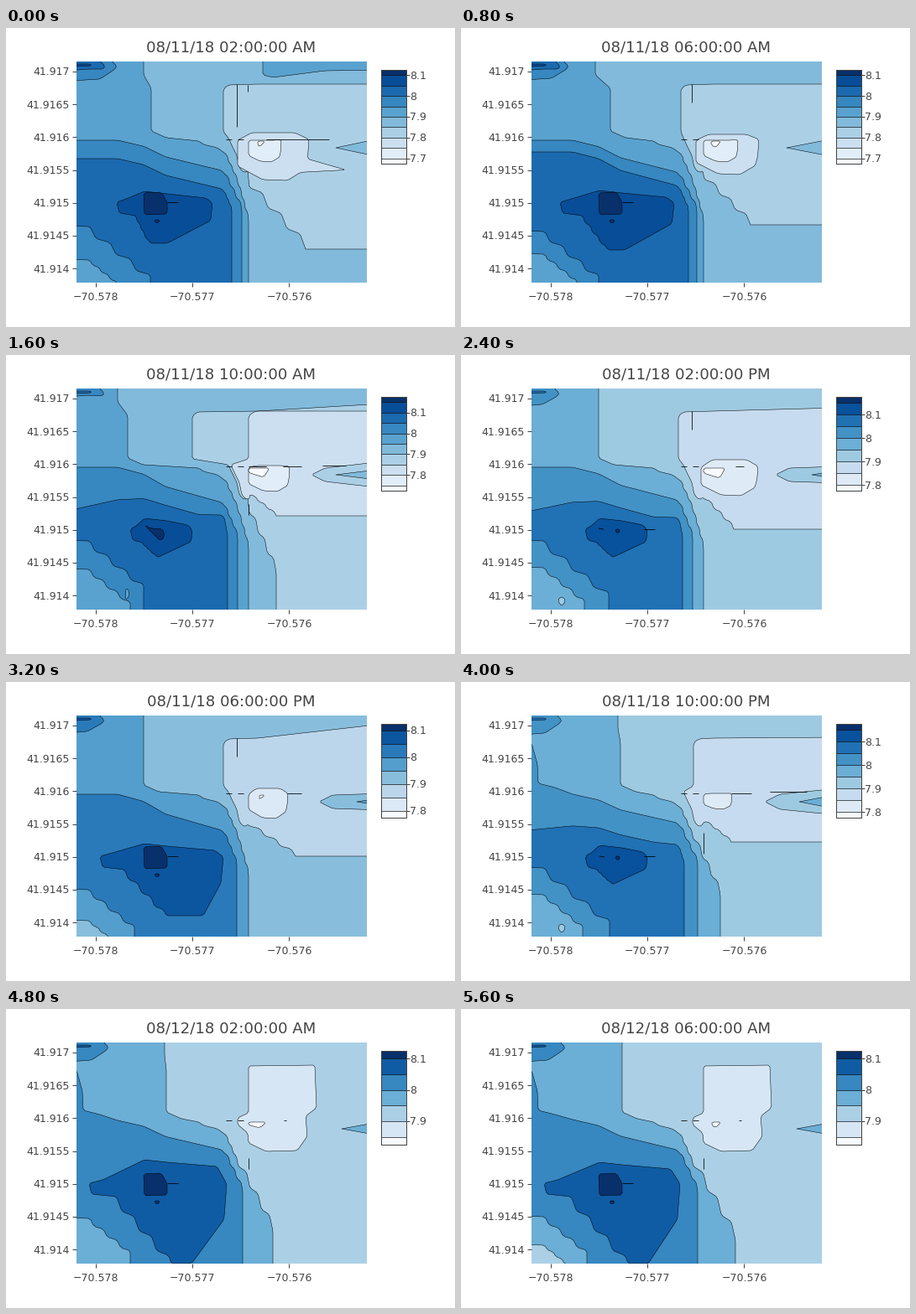
Recreate the animation shown at these times as a matplotlib script. Size 535 by 357 pixels, loop 6400 ms.

```python
import numpy as np
import matplotlib.pyplot as plt
from matplotlib.animation import FuncAnimation
from matplotlib.patches import Polygon, Rectangle

W, H, DPI = 535, 357, 100
PX = 72 / DPI
INK = "#444444"
LEFT, TOP, RIGHT, BOTTOM = 84, 40, 430, 304
# Outlines run past the plot edges to these lines and are clipped.
FAR_L, FAR_R, FAR_T, FAR_B = 60, 450, 20, 330
BLUES = np.array([(247, 251, 255), (222, 235, 247), (198, 219, 239),
                  (158, 202, 225), (107, 174, 214), (66, 146, 198),
                  (33, 113, 181), (8, 81, 156), (8, 48, 107)]) / 255

plt.rcParams["font.family"] = "DejaVu Sans"


# Contour rules: each returns the outline of one band.

def steps(x0, y0, x1, y1, n=3):
    """Staircase: mostly level, then a drop, n times."""
    pts = [(x0, y0)]
    for i in range(n):
        for u, v in ((0.7, 0.25), (1, 1)):
            pts.append((x0 + (x1 - x0) * (i + u) / n, y0 + (y1 - y0) * (i + v) / n))
    return pts


def tail(y, x):
    """Lower left edge, from the bottom at x up to the left side at y."""
    return [(x, FAR_B)] + steps(x, y + 0.8 * (x - 100), 100, y) + [(FAR_L, y - 1)]


def crest(x_top, x_mid, x_end, end=((FAR_L, FAR_B),)):
    """Region reaching the top edge, bounded by a line down to x_end."""
    pts = [(FAR_L, FAR_T), (x_top, FAR_T), (x_top, 56), (x_mid, 72), (x_mid, 123),
           (x_mid + 18, 131), (230, 135), (235, 139), (252, 143)]
    pts += steps(260, 149, 276, 184) + steps(277, 188, x_end, 230 + 1.2 * (x_end - 289))
    return pts + [(x_end, FAR_B), *end]


def front(y0, y1, x_end, end, hump=0, lip=False):
    """Region bounded by a line from the left side at y0, past (259, y1), to x_end."""
    pts = [(FAR_L, y0)]
    if lip:
        pts = [(FAR_L, 70), (84, 73), (91, 98), (92, 121), (112, 126)]
    for x, fall, lift in ((133, 0, 0.9), (164, 0.2, 1), (190, 0.55, 0.6),
                          (230, 0.82, 0), (257, 1, 0)):
        pts.append((x, y0 + (y1 - y0) * fall - hump * lift))
    return pts + steps(260, y1 + 4, x_end, 217) + [(x_end, FAR_B), *end]


def blob(left, right, top, bottom, foot, half):
    """Closed peak, widest at y = 208, narrowing to a foot."""
    w, h = right - left, bottom - 208
    return [(left, 208), (left + 0.1 * w, 204), (165, top), (192, top + 3),
            (right - 0.07 * w, top + 8), (right, 209), (right - 0.02 * w, 208 + 0.45 * h),
            (foot + half, bottom), (foot - half, bottom),
            *steps(foot - half - 3, bottom - 0.1 * h, left + 0.2 * w, 224), (left + 3, 221)]


def corner(y, x):
    return [(FAR_L, y), (x - 20, y - 3), (x - 2, 49), (x, 45), (x - 6, 40),
            (x - 6, FAR_T), (FAR_L, FAR_T)]


def shelf(left, top, bend, floor=None, seam=0):
    """Low region on the right; its lower edge steps down to bend."""
    bx, by = bend
    floor = floor or by
    seam_pts = [(265, 131), (269, 140), (275, 152), (278, 167), (284, 173), (288, 170)]
    return [(FAR_R, top), (375, (top + 67) / 2), (300, 67), (left + 6, 68), (left, 73),
            (left, 124), *((x + seam, y) for x, y in seam_pts),
            *steps(290, 172 + (by - 208) / 3, bx, by), (bx, floor), (FAR_R, floor)]


def pocket(left, right, top, bottom, spur=None):
    w, h = right - left, bottom - top
    return [(left, 134), (left + 0.2 * w, top), (right - 0.2 * w, top), (right, 133),
            (right - 0.02 * w, top + 0.55 * h), (spur or right - 0.06 * w, top + 0.78 * h),
            (right - 0.12 * w, top + 0.83 * h), (right - 0.3 * w, bottom),
            (left + 0.35 * w, bottom - 1), (left, top + 0.7 * h)]


def chip(left, right, depth):
    return [(left, 135), (right, 135), (right - 7, 135 + depth), (left, 135 + depth / 2)]


def tongue(x, h, blunt=0):
    return [(FAR_R, 143 - h), (x + 2 * blunt, 143 - blunt), (x, 143),
            (x + 2 * blunt, 143 + blunt), (FAR_R, 143 + h)]


CORE = [(164, 197), (185, 196), (192, 208), (192, 222), (165, 223)]
CHEVRON = [(176, 229), (184, 229), (180, 234)]
SLIVER = [(FAR_L, 43), (100, 43), (102, 45), (FAR_L, 47)]
RING = [(115, 293), (120, 288), (125, 293), (120, 300)]
NOTCH = [(183, 208), (190, 208), (187, 214)]
SHELL = [(306, FAR_T), (306, 56), (318, 59), (380, 51), (FAR_R, 50), (FAR_R, FAR_T)]
ISLAND = [(289, 68), (368, 67), (370, 118), (357, 128), (359, 152), (347, 169),
          (310, 170), (289, 160), (288, 148), (276, 138), (276, 130), (289, 124)]
ARROW = blob(148, 222, 195, 241, 181, 1)


class Scene:
    """lo is the lowest band, n the number of bands, base the backdrop's band."""

    def __init__(self, lo, n, base, shapes, dashes=()):
        self.lo, self.n, self.base = lo, n, base
        self.shapes = shapes
        self.dashes = [(262, 133, 269, 133), (276, 133, 283, 133), *dashes]

    def color(self, band):
        pos = np.clip((band - self.lo) / (self.n - 1), 0, 1) * 8
        return [np.interp(pos, range(9), BLUES[:, c]) for c in range(3)]


RIDGE = (192, 208, 205, 208)
SLOT = (275, 67, 275, 89)
STEM = (289, 178, 289, 191)

SCENES = [
    Scene(0, 10, 4, [
        (5, crest(164, 173, 289)), (6, front(134, 170, 281, tail(277, 132))),
        (7, front(156, 192, 269, tail(237, 172))), (8, blob(132, 246, 195, 257, 182, 10)),
        (9, CORE), (9, CHEVRON), (6, corner(64, 132)), (7, corner(52, 118)),
        (8, SLIVER), (5, SHELL), (3, shelf(259, 67, (357, 264))),
        (2, pocket(276, 361, 125, 182, 405)), (1, pocket(289, 328, 134, 160)),
        (0, chip(300, 309, 7)), (4, tongue(393, 12))],
        [RIDGE, (275, 67, 275, 118), (288, 68, 288, 76), (310, 133, 385, 133)]),
    Scene(0, 10, 4, [
        (5, crest(160, 178, 289)), (6, front(134, 172, 281, tail(270, 138))),
        (7, front(148, 188, 271, tail(243, 164))), (8, blob(118, 254, 194, 265, 185, 10)),
        (9, CORE), (9, CHEVRON), (6, corner(63, 128)), (7, corner(52, 118)),
        (8, SLIVER), (3, shelf(262, 67, (345, 235))),
        (2, pocket(280, 355, 127, 175)), (1, pocket(289, 330, 134, 160)),
        (0, chip(298, 310, 8)), (4, tongue(388, 12))],
        [RIDGE, SLOT]),
    Scene(1, 10, 5, [
        (6, crest(133, 145, 289)), (7, front(134, 176, 276, tail(256, 148))),
        (8, front(189, 191, 264, tail(222, 164), hump=18)), (9, ARROW),
        (10, [(165, 203), (173, 207), (187, 208), (189, 217), (184, 222)]),
        (7, corner(51, 117)), (8, SLIVER),
        (6, [(143, 278), (147, 282), (146, 290), (142, 292)]),
        (4, shelf(222, 58, (322, 260), FAR_B)), (3, shelf(289, 67, (322, 192), seam=3)),
        (2, pocket(289, 338, 132, 163)), (1, chip(289, 314, 11)),
        (4, tongue(364, 16, 8)), (5, tongue(393, 7))],
        [(289, 133, 310, 133), (330, 133, 352, 133), (377, 132, 405, 132), STEM]),
    Scene(2, 9, 5, [
        (6, crest(164, 164, 289)), (7, front(134, 173, 276, tail(254, 147))),
        (8, front(191, 194, 264, tail(222, 176), hump=17)), (9, ARROW), (10, NOTCH),
        (7, corner(62, 117)), (8, SLIVER), (5, RING),
        (4, shelf(259, 63, (325, 208))), (3, pocket(286, 354, 125, 168)),
        (2, chip(289, 315, 12)), (5, tongue(375, 10, 8)), (6, tongue(418, 5))],
        [SLOT, (327, 133, 337, 133), (164, 207, 170, 208), (218, 208, 231, 208)]),
    Scene(2, 8, 5, [
        (6, crest(164, 164, 289, tail(285, 130))),
        (7, front(134, 177, 275, tail(248, 153))), (8, blob(112, 259, 193, 279, 213, 22)),
        (9, CORE), (9, CHEVRON), (7, corner(62, 117)), (8, SLIVER),
        (4, shelf(259, 50, (345, 208))), (3, pocket(289, 336, 127, 163)),
        (2, chip(302, 309, 5)), (5, tongue(373, 10, 8)), (6, tongue(418, 5))],
        [RIDGE, SLOT, (335, 133, 352, 133)]),
    Scene(2, 9, 5, [
        (6, crest(187, 190, 309)), (7, front(134, 168, 282, tail(254, 145), lip=True)),
        (8, front(179, 194, 266, tail(222, 177), hump=8)), (9, ARROW), (10, NOTCH),
        (7, corner(64, 120)), (8, SLIVER), (5, RING),
        (4, shelf(277, 66, (322, 191))), (3, pocket(289, 323, 133, 152)),
        (5, tongue(362, 16, 9)), (6, tongue(403, 9))],
        [(322, 133, 346, 133), (368, 131, 412, 131), (289, 180, 289, 205),
         (165, 208, 171, 209), (218, 208, 231, 208)]),
    Scene(3, 7, 5, [
        (6, crest(189, 191, 318)), (7, front(133, 168, 282, tail(250, 148), lip=True)),
        (8, blob(99, 263, 180, 304, 209, 12)), (9, CORE), (9, CHEVRON),
        (7, corner(64, 122)), (8, SLIVER), (4, ISLAND), (3, chip(289, 310, 7)),
        (6, tongue(400, 9))],
        [RIDGE, STEM, (331, 133, 334, 133)]),
    Scene(3, 7, 5, [
        (6, crest(192, 192, 327, tail(282, 130))),
        (7, front(132, 168, 282, tail(248, 150), lip=True)),
        (8, blob(99, 261, 183, 304, 211, 12)), (9, CORE), (9, CHEVRON),
        (7, corner(64, 124)), (8, SLIVER), (4, ISLAND), (3, chip(299, 310, 7)),
        (6, tongue(400, 9))],
        [RIDGE, STEM, (331, 133, 334, 133)]),
]

fig = plt.figure(figsize=(W / DPI, H / DPI), dpi=DPI, facecolor="white")
ax = fig.add_axes([0, 0, 1, 1])


def soften(pts, cut=2.2):
    """Round the corners of a closed outline."""
    pts = np.array(pts, float)
    out = []
    for i, p in enumerate(pts):
        for q in (pts[i - 1], pts[(i + 1) % len(pts)]):
            d = np.hypot(*(q - p))
            out.append(p + (q - p) * min(cut / max(d, 1e-6), 0.33))
    return out


def stroke(xs, ys, color=INK, width=1.0):
    return ax.plot(xs, ys, color=color, lw=width * PX, solid_capstyle="butt")[0]


def label(x, y, text, size=12.5, ha="center"):
    ax.text(x, y, text, fontsize=size * PX, color=INK, ha=ha, va="baseline")


def box(x, y, w, h, **kw):
    return ax.add_patch(Rectangle((x, y), w, h, **kw))


def draw_field(scene):
    area = box(LEFT, TOP, RIGHT - LEFT, BOTTOM - TOP, fc=scene.color(scene.base), lw=0)
    for band, pts in scene.shapes:
        patch = Polygon(soften(pts), fc=scene.color(band), ec="black",
                        lw=0.5 * PX, joinstyle="round")
        ax.add_patch(patch)
        patch.set_clip_path(area)
    for x0, y0, x1, y1 in scene.dashes:
        stroke([x0, x1], [y0, y1], "black", 0.8)


def draw_axes():
    for k in range(7):
        y = 52 + 39.17 * k
        stroke([79, 84], [y, y])
        label(76, y + 4.5, f"{41.917 - 0.0005 * k:.4f}".rstrip("0"), ha="right")
    for k in range(3):
        x = 107 + 115.2 * k
        stroke([x, x], [304, 309])
        label(x, 325, f"\u2212{70.578 - 0.001 * k:.3f}")


def draw_bar(scene):
    x, y0, y1 = 447, 50, 162
    step = (y1 - y0) / (scene.n - 1)
    for i in range(scene.n):
        top = max(y0, y1 - (i + 0.5) * step)
        low = min(y1, y1 - (i - 0.5) * step)
        box(x, top, 30, low - top, fc=scene.color(scene.lo + i), ec="black", lw=0.5 * PX)
        level = scene.lo + i
        if i < scene.n - 1 and level % 2 == 0:
            stroke([477, 481], [top, top])
            label(481.5, top + 4.5, f"{round(7.7 + 0.05 * level, 1):g}", ha="left")
    box(x, y0, 30, y1 - y0, fill=False, ec=INK, lw=PX)


def draw(frame):
    ax.clear()
    ax.set_xlim(0, W)
    ax.set_ylim(H, 0)
    ax.axis("off")
    scene = SCENES[frame]
    draw_field(scene)
    draw_axes()
    draw_bar(scene)
    day, hour = divmod(2 + 4 * frame, 24)
    half = "AM" if hour < 12 else "PM"
    label(268, 28, f"08/{11 + day}/18 {(hour - 1) % 12 + 1:02d}:00:00 {half}", 18.2)
    return []


anim = FuncAnimation(fig, draw, frames=8, interval=800, init_func=lambda: [],
                     repeat=True, repeat_delay=0)
plt.show()
```
